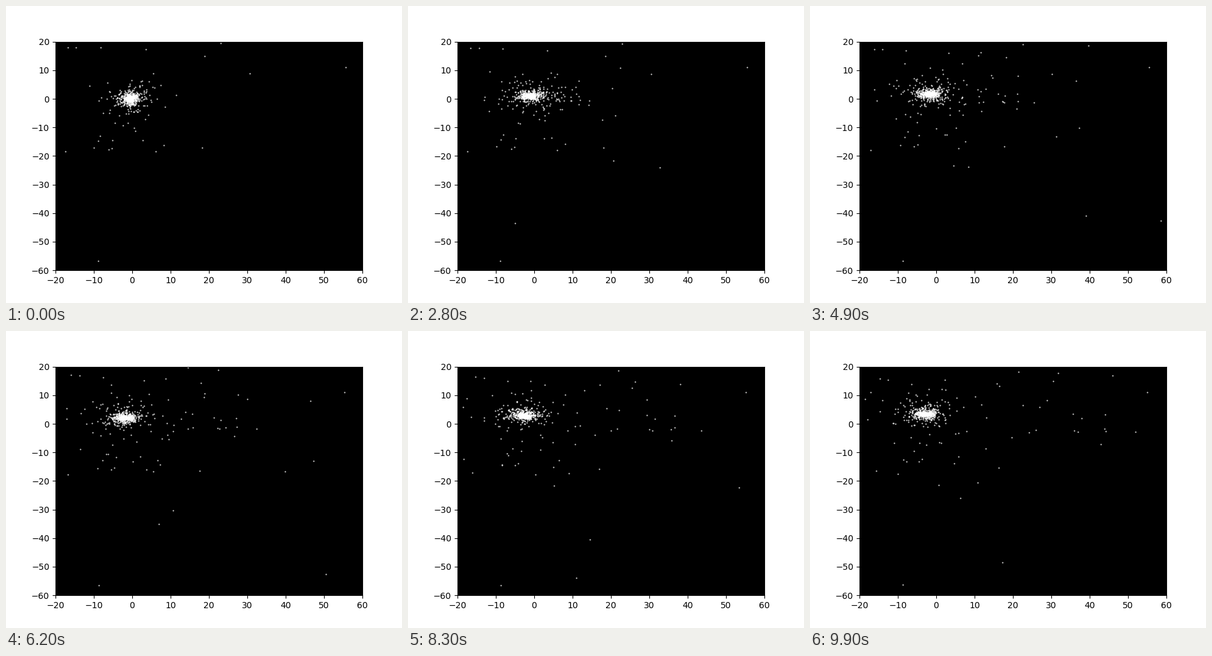
Animation, 640 px wide and 480 px high, one loop 10000 ms. Source, as a matplotlib script:

```python
import numpy as np
import matplotlib.pyplot as plt
from matplotlib.animation import FuncAnimation

FRAMES, STEP = 100, 100
GM = 36             # pull of the core on the outer stars
BOUND, RIM, FAN, FALL_OUT = 680, 9, 20, 8
rng = np.random.default_rng(12)


def polar(r, angle):
    return np.array([r * np.cos(angle), r * np.sin(angle)])


def core(t):
    return np.array([[-0.5 - 0.24 * t], [0.1 + 0.32 * t]])


# Inner stars on elliptical orbits
radius = np.minimum(1.25 * np.exp(rng.standard_normal(BOUND)), 12)
tilt, phase = rng.uniform(0, 2 * np.pi, (2, BOUND))
ratio = rng.uniform(0.45, 1, BOUND)
omega = GM ** 0.5 / (radius ** 2 + 0.3) ** 0.75 * rng.choice((-1, 1), BOUND)

# Outer stars released from rest: the far ones, then a loose rim
far = np.array([(55.6, 11.1), (30.6, 8.8), (23, 19.4), (18.8, 15),
                (3.5, 17.4), (-8.3, 17.9), (-14.6, 17.9), (-16.7, 17.9),
                (18.3, -17.2), (-17.5, -18.5), (-8.8, -56.8)]).T
rim = polar(rng.uniform(13, 21, RIM), rng.uniform(-2.4, -1.1, RIM))
outer = np.hstack([far, rim])

# Stars flung out of the core: vx, vy and launch time of the fastest
fast = np.array([(12.3, -8.9, 0.1), (8.8, -9.1, 0.4), (1.8, -4.9, 0),
                 (1.9, -9, 2.3), (8.2, 3.8, 0), (7.7, -2.1, 0),
                 (6.5, -2.7, 0), (7.7, 1.3, 0.1), (5.3, -0.3, 0),
                 (-1.6, -15.6, 0)]).T
fan = polar(rng.uniform(1.8, 5.5, FAN), rng.normal(0.1, 0.35, FAN))
drop = polar(rng.uniform(1.5, 4, FALL_OUT), rng.uniform(-2.8, -0.4, FALL_OUT))
velocity = np.hstack([fast[:2], fan, drop])
launch = np.append(fast[2], rng.exponential(0.7, FAN + FALL_OUT))


def bound(t):
    a = phase + omega * t
    u, v = radius * np.cos(a), radius * ratio * np.sin(a)
    x = u * np.cos(tilt) - v * np.sin(tilt)
    y = u * np.sin(tilt) + v * np.cos(tilt)
    spread = 1 - np.exp(-t / 1.2)
    x *= 1 + 0.4 * spread
    y *= 1 - 0.45 * spread * np.exp(-radius / 3)
    y += 0.012 * t * radius         # the halo runs ahead of the core
    return core(t) + [x, y]


def falling(t):
    r = np.hypot(*outer)
    return outer * (1 - 0.5 * GM * t ** 2 / r ** 3)


def escaping(t):
    age = t - launch
    return np.where(age > 0, core(0) + velocity * age, core(t))


fig, ax = plt.subplots(figsize=(6.4, 4.8), dpi=100)
ax.set_facecolor("black")
ax.set_xlim(-20, 60)
ax.set_ylim(-60, 20)
stars, = ax.plot([], [], "w.", markersize=1)


def update(i):
    t = i * STEP / 1000
    stars.set_data(*np.hstack([bound(t), falling(t), escaping(t)]))
    return stars,


anim = FuncAnimation(fig, update, frames=FRAMES, interval=STEP, repeat=True)
plt.show()
```
